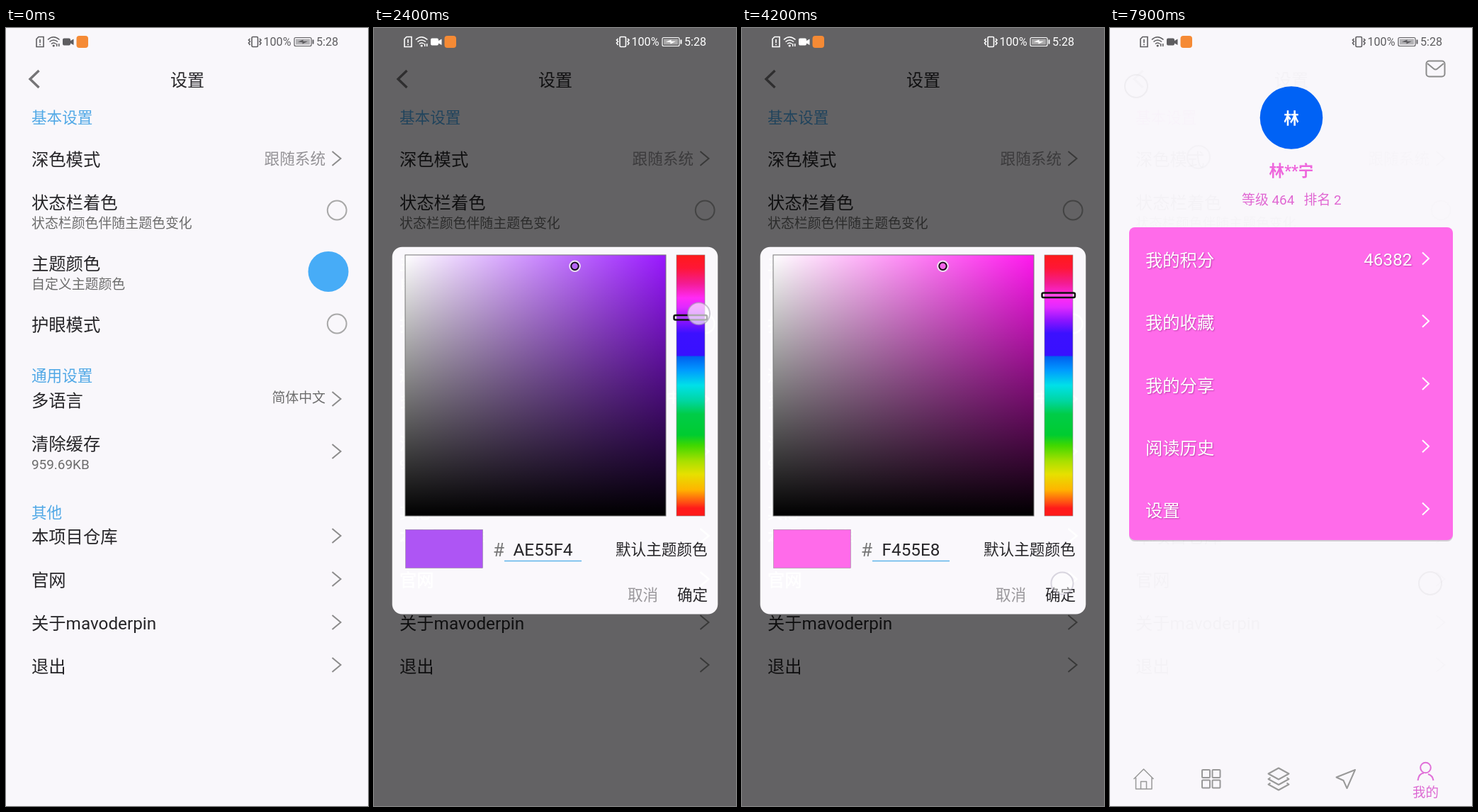
These frames come from a looping animation (511 by 1097 pixels, 8000 ms). An HTML page:

```html
<!DOCTYPE html>
<html lang="zh-CN">
<head>
<meta charset="utf-8">
<style>
html, body { margin: 0; width: 100%; height: 100%; overflow: hidden; background: #f9f7fb; }
svg { display: block; width: 100vw; height: 100vh; }
text { font-family: Roboto, "Noto Sans CJK SC", "Noto Sans CJK", sans-serif; white-space: pre; }
.accent { fill: var(--accent); }
text.accent { fill: var(--accent-text); }
.line { fill: none; stroke: #8c8c8c; stroke-width: 2; }
.ring { fill: none; stroke: #a8a8a8; stroke-width: 2; }
.white text, .white .accent { fill: #fff; stroke: #fff; stroke-width: .6; }
.white .line, .white .ring { stroke: #fff; stroke-width: 2.5; }
#nav .line { stroke: #999; stroke-linejoin: round; }
#nav .line.on { stroke: #e070d8; }
#card text { fill: #fff; text-shadow: 1px 1px 2px rgba(90, 0, 80, .4); }
#card .line { stroke: #fff; }
</style>
</head>
<body>
<svg id="stage" viewBox="0 0 511 1097" preserveAspectRatio="none"></svg>
<script>
const LOOP = 8000, BLUE = '#47acf7', PINK = '#ff6bea';
const LARGE = 24.3, MEDIUM = 21.6, SMALL = 18.9, STATUS = 16.1;

// Text is placed by its vertical centre.
const text = (x, y, str, size = LARGE, fill = '#262528', extra = '') =>
  `<text x="${x}" y="${y + size * .38}" font-size="${size}" fill="${fill}" ${extra}>${str}</text>`;
const middle = 'text-anchor="middle"', end = 'text-anchor="end"';
const path = (d, cls = 'line', extra = '') => `<path class="${cls}" d="${d}" ${extra}/>`;
const chevron = (x, y, w = 12, h = 10) => path(`M${x - w} ${y - h}L${x} ${y}L${x - w} ${y + h}`);
const heading = (y, str) => text(36, y, str, MEDIUM, '', 'class="accent"');
const stops = list => list.map(([at, color, alpha = 1]) =>
  `<stop offset="${at}" stop-color="${color}" stop-opacity="${alpha}"/>`).join('');

const settings = [
  path('M46.5 60L34 72L46.5 84', 'line', 'style="stroke-width:3.4;stroke:#757477"'),
  text(256, 73, '设置', 24, '#262528', middle),
  heading(126, '基本设置'), heading(490, '通用设置'), heading(683, '其他'),
  ...[[185, '深色模式'], [246, '状态栏着色'], [332, '主题颜色'], [418, '护眼模式'], [525, '多语言'],
    [586, '清除缓存'], [717, '本项目仓库'], [778, '官网'], [838.5, '关于mavoderpin'], [900, '退出']]
    .map(([y, str]) => text(36, y, str)),
  ...[[275, '状态栏颜色伴随主题色变化'], [361, '自定义主题颜色'], [615, '959.69KB']]
    .map(([y, str]) => text(36, y, str, SMALL, '#6c6c6c')),
  text(451, 184, '跟随系统', MEDIUM, '#949296', end),
  text(451, 521, '简体中文', SMALL, '#6c6c6c', end),
  ...[184, 523, 597, 716, 777, 838, 898].map(y => chevron(472.5, y)),
  ...[257, 417].map(y => `<circle class="ring" cx="467.2" cy="${y}" r="13.4"/>`),
].join('');

const status = `
  <g fill="none" stroke="currentColor" stroke-width="1.6">
    <path d="M43 15.5L46 12.5H53V26.5H43ZM48 16V21M48 22.6V24.2"/>
    <path d="M59 16.5Q67 9 75.5 16.5M61.5 19.5Q67 14.5 73 19.5M64 22.5Q67 19.5 70.5 22.5"/>
    <rect x="347" y="12.5" width="8.5" height="14" rx="1.5"/>
    <path d="M344.5 15L342.5 17L344.5 19L342.5 21L344.5 24M358 15L360 17L358 19L360 21L358 24"/>
    <rect x="407" y="13.5" width="24" height="12" rx="2" stroke-width="1.2"/>
    <path d="M433.5 16.5V22.5" stroke-width="2"/>
  </g>
  <g fill="currentColor">
    <circle cx="67.2" cy="25" r="1.6"/>
    <path d="M71 22H72.5V26H71ZM74 22H75.5V26H74Z"/>
    <path d="M82 14.5H89Q91 14.5 91 16.5V18L95.5 15.5V24L91 21.5V22.5Q91 24.5 89 24.5H82Q80 24.5 80 22.5V16.5Q80 14.5 82 14.5Z"/>
    <rect x="409" y="15.5" width="20" height="8" opacity=".45"/>
    <path d="M412 19.5L419.5 16.5V18.8H426L418.5 22.5V20.3Z"/>
  </g>
  <rect x="99.5" y="11" width="16.5" height="17" rx="4" fill="#f58a35"/>
  ${text(363.5, 19.3, '100%', STATUS, 'currentColor')}${text(438, 19.3, '5:28', STATUS, 'currentColor')}`;

const hueStops = [[0, '#ff1a1a'], [.05, '#ff1636'], [.11, '#f31c94'], [.165, '#ff2af5'], [.2, '#e02aff'],
  [.25, '#8e14ff'], [.3, '#3c10ff'], [.385, '#3810ff'], [.39, '#0060f0'], [.44, '#0098ff'], [.5, '#00e0e8'],
  [.56, '#00d6a0'], [.61, '#00cc48'], [.69, '#00cc30'], [.73, '#40d800'], [.79, '#a8e000'],
  [.84, '#e6e000'], [.9, '#ffb400'], [.95, '#ff4a14'], [.97, '#ff1a1a'], [1, '#ff1a1a']];

const dialog = `
  <rect x="25.7" y="308.7" width="459.6" height="517.8" rx="14" fill="#faf8fc"/>
  <g class="white" clip-path="url(#dialogClip)">${settings}</g>
  <rect id="hueFill" x="44" y="320" width="368" height="368"/>
  <rect x="44" y="320" width="368" height="368" fill="url(#toWhite)"/>
  <rect x="44" y="320" width="368" height="368" fill="url(#toBlack)" stroke="#777"/>
  <g fill="none" stroke-width="1.9">
    <circle cx="283.5" cy="335.8" r="7.3" stroke="#ebe8ee"/>
    <circle cx="283.5" cy="335.8" r="5.2" stroke="#111"/>
  </g>
  <rect x="427" y="320" width="40" height="368" fill="url(#hues)" stroke="#888" stroke-width=".6"/>
  <rect id="thumb" x="423.5" width="46.5" height="6.5" rx="2" fill="#fff" fill-opacity=".15" stroke="#111" stroke-width="2.5"/>
  <rect id="swatch" x="44.5" y="707.2" width="109" height="54.3" stroke="#888" stroke-width=".5"/>
  ${text(168, 735, '#', 26, '#777')}
  ${text(238.5, 734.5, '', LARGE, '#262528', middle + ' id="hex"')}
  <path d="M184 751.5H293" stroke="#5db4ea" stroke-width="1.6"/>
  ${text(341, 735, '默认主题颜色', MEDIUM)}
  ${text(358, 799, '取消', MEDIUM, '#9a989c')}${text(428, 799, '确定', MEDIUM)}`;

const nav = [
  path('M33.5 1059L47.5 1045L61.5 1059M36.5 1057V1073H59V1057M43.5 1073V1062.5H51.5V1073', 'line', 'style="stroke-width:1.5"'),
  ...[[130, 1046], [144.5, 1046], [130, 1060.5], [144.5, 1060.5]].map(([x, y]) =>
    `<rect class="line" x="${x}" y="${y}" width="11" height="11" rx="1"/>`),
  path('M238 1043.5L252.5 1051.5L238 1059.5L223.5 1051.5ZM226.5 1057L223.5 1059L238 1067L252.5 1059L249.5 1057M226.5 1064.5L223.5 1066.5L238 1074.5L252.5 1066.5L249.5 1064.5'),
  path('M346 1046L319.5 1056.5L329.5 1061L334.5 1072Z'),
  '<circle class="line on" cx="445.5" cy="1043" r="7.3"/>',
  path('M434.5 1061Q436 1051 443 1050.5M449 1052Q455.5 1054 456.5 1061', 'line on'),
  text(445.5, 1077, '我的', 18.5, '#dc68d2', middle),
].join('');

const profile = `
  <rect class="line" x="446.5" y="46.5" width="26" height="22" rx="4"/>
  ${path('M448 50L457 57.5Q459.5 59.5 462 57.5L471 50')}
  <circle cx="256" cy="126.5" r="44.3" fill="#0062f5"/>
  ${text(256, 127, '林', MEDIUM, '#fff', middle + ' font-weight="700"')}
  ${text(256, 200.5, '林**宁', MEDIUM, '#ee66dc', middle + ' font-weight="700"')}
  ${text(186, 242, '等级 464', SMALL, '#e066d2')}${text(273.5, 242, '排名 2', SMALL, '#e066d2')}
  <g id="card">
    <rect x="27" y="283" width="457" height="441" rx="8" fill="#000" opacity=".16"/>
    <rect x="27" y="281" width="457" height="441" rx="8" fill="${PINK}"/>
    ${['我的积分', '我的收藏', '我的分享', '阅读历史', '设置'].map((str, i) =>
      text(50, 327 + i * 88.25, str) + chevron(450, 325 + i * 88.25, 9, 8.5)).join('')}
    ${text(426.5, 326, '46382', LARGE, '#fff', end)}
  </g>`;

const traces = [[37, 82, 1], [452, 783, 1], [125, 182, .5]].map(([x, y, o]) =>
  `<circle cx="${x}" cy="${y}" r="16" fill="none" stroke="#efedf1" stroke-width="2" opacity="${o}"/>`).join('');

document.getElementById('stage').innerHTML = `
  <defs>
    <linearGradient id="toWhite">${stops([[0, '#fff'], [1, '#fff', 0]])}</linearGradient>
    <linearGradient id="toBlack" x2="0" y2="1">${stops([[0, '#000', 0], [1, '#000']])}</linearGradient>
    <linearGradient id="hues" x2="0" y2="1">${stops(hueStops)}</linearGradient>
    <clipPath id="dialogClip"><rect x="26" y="309" width="459" height="517" rx="14"/></clipPath>
  </defs>
  <rect width="511" height="1097" fill="#f9f7fb"/>
  <g id="traces">${traces}</g>
  <g id="settings">${settings}<circle id="theme" class="accent" cx="455" cy="343.4" r="28.5"/></g>
  <g id="nav">${nav}</g>
  <g id="profile">${profile}</g>
  <rect id="shade" width="511" height="1097"/>
  <g id="dialog">${dialog}</g>
  <g id="status">${status}</g>
  <circle id="touch" r="15.5" fill="#fff" fill-opacity=".65" stroke="#a09cb0" stroke-opacity=".55" stroke-width="2"/>`;

const el = Object.fromEntries([...document.querySelectorAll('#stage [id]')].map(node => [node.id, node]));
const show = (node, alpha) => {
  node.style.display = alpha > 0 ? '' : 'none';
  node.style.opacity = alpha;
};

// Linear interpolation through [time, value] points.
function track(t, points) {
  if (t <= points[0][0]) return points[0][1];
  for (let i = 1; i < points.length; i++) {
    const [t0, v0] = points[i - 1], [t1, v1] = points[i];
    if (t <= t1) return v0 + (v1 - v0) * (t - t0) / (t1 - t0);
  }
  return points[points.length - 1][1];
}

const drag = [[2100, 477.4], [2200, 462], [2300, 435], [2400, 408.3], [2500, 396], [2600, 386], [2700, 380], [2800, 376.7]];
const dialogFade = [[1200, 0], [1300, .4], [1400, .85], [1500, 1], [4200, 1], [4300, .75], [4400, .4], [4500, .12], [4600, 0]];

function hueToHex(hue, low, high) {
  const channel = n => {
    const k = (n + hue / 60) % 6;
    const v = high - (high - low) * Math.max(0, Math.min(k, 4 - k, 1));
    return Math.round(v).toString(16).padStart(2, '0');
  };
  return (channel(5) + channel(3) + channel(1)).toUpperCase();
}

const taps = [
  { from: 1200, to: 1400, x: 455, y: 343 },
  { from: 2100, to: 3100, x: 458.5, y: t => Math.min(477, track(t + 45, drag)) },
  { from: 4000, to: 4340, x: 452, y: 783 },
  { from: 5000, to: 5300, x: 125, y: 182 },
  { from: 5500, to: 5900, x: 37, y: 82 },
];

function render(t) {
  const open = track(t, dialogFade);
  const themed = t >= 4300;
  document.body.style.setProperty('--accent', themed ? PINK : BLUE);
  document.body.style.setProperty('--accent-text', themed ? '#f26be0' : '#50a8e6');

  show(el.settings, t < 5900 ? 1 : t < 6000 ? .5 : .02);
  el.theme.style.display = t < 6000 ? '' : 'none';
  show(el.traces, t >= 6000 ? 1 : 0);
  show(el.nav, t < 5900 ? 0 : t < 6000 ? .5 : 1);
  show(el.profile, t >= 7800 ? 1 : 0);
  show(el.shade, open * .6);
  show(el.dialog, open);
  el.status.style.color = open > .5 ? '#fff' : '#5e5d60';

  const y = track(t, drag);
  const hue = 360 * (1 - (y - 320) / 368);
  const hex = hueToHex(hue, 85, 244);
  el.thumb.setAttribute('y', y - 3.3);
  el.hueFill.setAttribute('fill', '#' + hueToHex(hue, 24, 255));
  el.swatch.setAttribute('fill', t < 2200 ? BLUE : t >= 2800 ? PINK : '#' + hex);
  el.hex.textContent = t < 2200 ? '55AFF4' : t >= 2800 ? 'F455E8' : hex;

  const tap = taps.find(p => t >= p.from && t < p.to);
  show(el.touch, tap ? Math.min(1, (tap.to - t) / 200) : 0);
  if (tap) {
    el.touch.setAttribute('cx', tap.x);
    el.touch.setAttribute('cy', typeof tap.y === 'function' ? tap.y(t) : tap.y);
  }
}

const start = performance.now();
function tick() {
  const t = (performance.now() - start) % LOOP;
  render(Math.floor(t / 100) * 100);
  requestAnimationFrame(tick);
}
tick();
</script>
</body>
</html>
```
